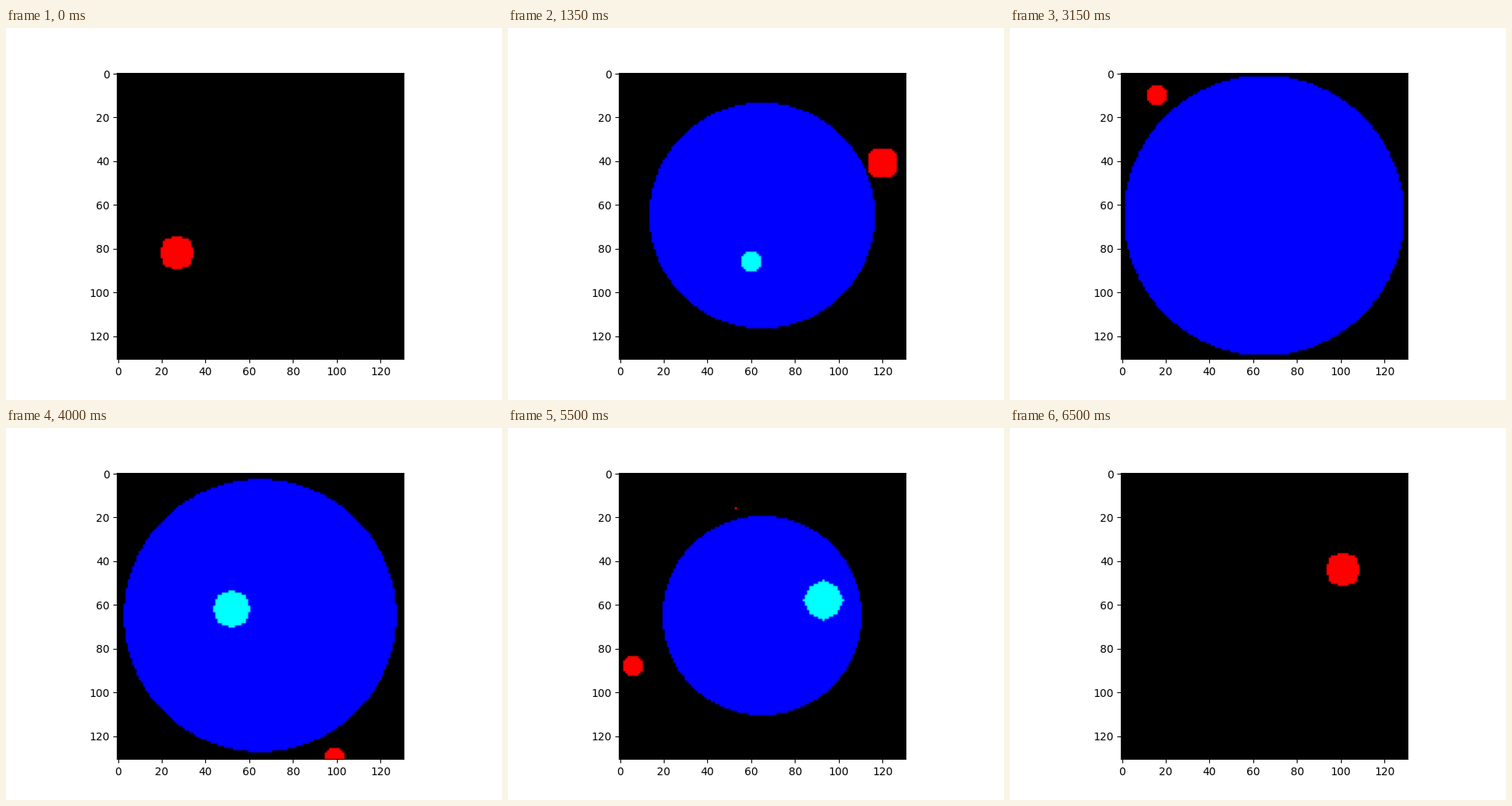
Write a matplotlib script that moves like this. It is 640 px wide and 480 px high and loops after 6.55 s.

```python
import matplotlib.pyplot as plt
import numpy as np
from matplotlib.animation import FuncAnimation

# Slices along z through a ball with grains inside it and on its surface
SIZE = 131
MID = SIZE // 2
RADIUS = 64
GRAIN = 9
SHELL = RADIUS + GRAIN + 0.82

RED, BLUE, CYAN = (255, 0, 0), (0, 0, 255), (0, 255, 255)

y, x = np.mgrid[:SIZE, :SIZE] - MID


def on_shell(dx, dy, side):
    """Place a grain on the shell, on the near (-1) or far (+1) side."""
    return dx, dy, side * round((SHELL ** 2 - dx ** 2 - dy ** 2) ** 0.5)


# Key points, as offsets from the centre of the ball
near = [(-38, 17), (12, 54), (55, -24)]
far = [(-49, -55), (34, 65), (-59, 23), (-12, -49), (36, -21)]
outer = [on_shell(*p, -1) for p in near] + [on_shell(*p, 1) for p in far]
inner = [(-5, 21, -45), (31, 21, -27), (-13, -3, 13), (28, -7, 45)]


def grain(centre, z):
    """Slice of a faceted grain: a small voxel ball dilated by itself."""
    cx, cy, cz = centre
    offsets = abs(np.stack([x - cx, y - cy, np.full_like(x, z - cz)]))
    low, mid, high = np.sort(offsets, axis=0)
    return ((2 * high + mid <= 2 * GRAIN)
            & (3 * high + mid + low <= 3 * GRAIN)
            & (3 * (high + mid + low) <= 5 * GRAIN))


def render(frame):
    z = frame - MID
    img = np.zeros((SIZE, SIZE, 3), np.uint8)
    img[x ** 2 + y ** 2 + z ** 2 <= RADIUS ** 2] = BLUE
    for centres, colour in ((outer, RED), (inner, CYAN)):
        for centre in centres:
            if abs(z - centre[2]) <= GRAIN:
                img[grain(centre, z)] = colour
    return img


fig, ax = plt.subplots(figsize=(6.4, 4.8), dpi=100)
picture = ax.imshow(render(0))


def update(frame):
    picture.set_data(render(frame))
    return [picture]


anim = FuncAnimation(fig, update, frames=SIZE, interval=50,
                     repeat=True, repeat_delay=0, blit=False)
plt.show()
```
